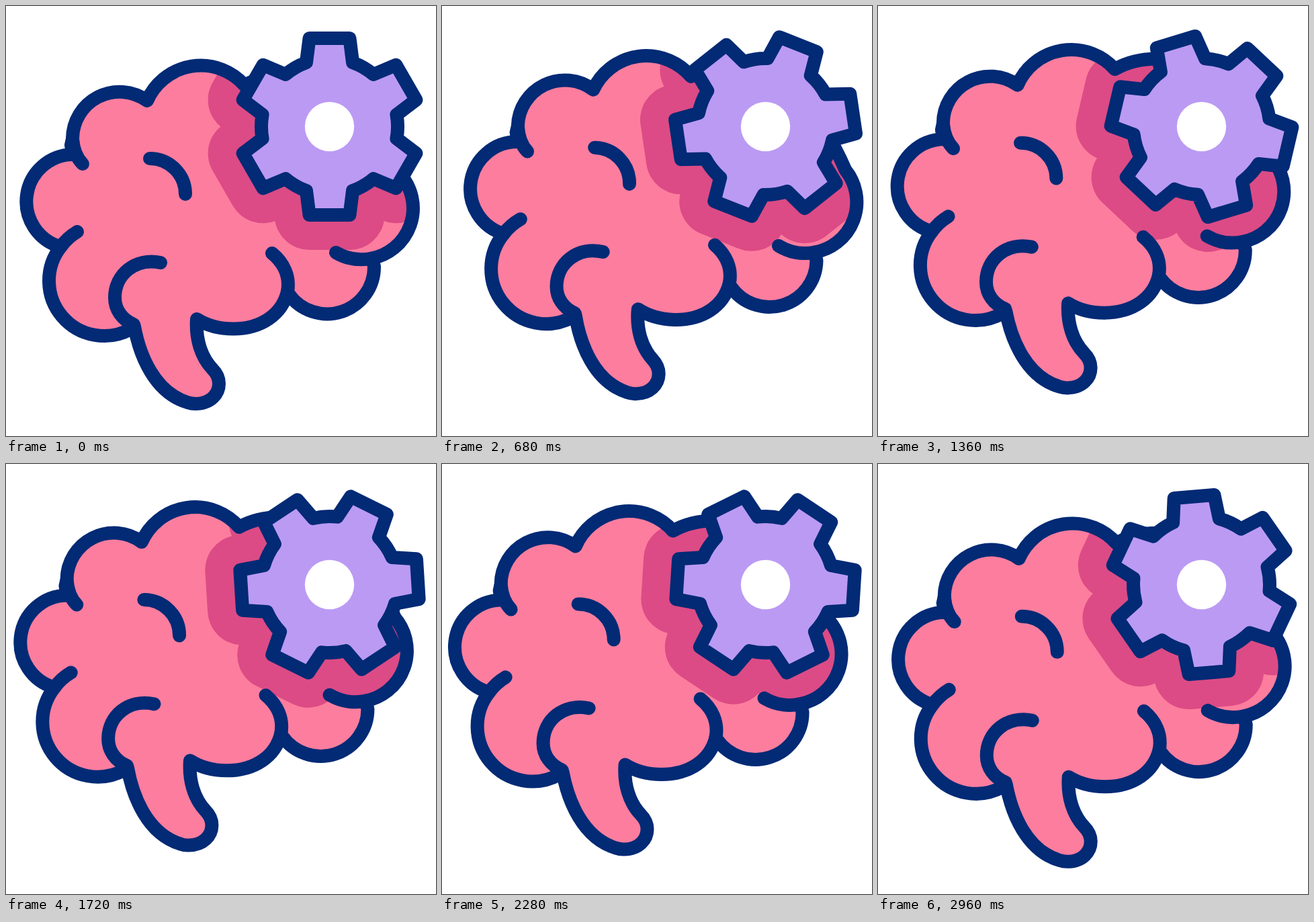
An HTML page that plays this animation: 640x640 px, repeating every 3000 ms.

```html
<!DOCTYPE html>
<html lang="en">
<head>
<meta charset="utf-8">
<title>Brain and gear</title>
<style>
  html, body { margin: 0; width: 100%; height: 100%; overflow: hidden; background: #fff; }
  svg { display: block; width: 100%; height: 100%; }
  .line { fill: none; stroke: #022a75; stroke-width: 20; stroke-linecap: round; stroke-linejoin: round; }
  .flesh { fill: #fd7d9e; }
  .shadow { fill: #dc4b85; stroke: #dc4b85; stroke-width: 104; stroke-linejoin: round; }
  .gear { fill: #bb9af3; stroke: #022a75; stroke-width: 20; stroke-linejoin: round; }
</style>
</head>
<body>
<svg viewBox="0 0 640 640">
  <defs>
    <path id="outline" d="M210 141A87 87 0 0 1 355 118Q382 103 415 103C490 103 548 165 588 252
      A76 76 0 0 1 545 375.5L548 388A70 70 0 0 1 421 429L419 425
      C411 459 380 480.5 338 480.5C318 480.5 300 476 284 466
      C282 495 290 522 307 540C312 545 317 552 317 562C317 577 305 592 282 592
      Q276 592 270 590C221 575 199 520 191 477L185.8 480.7
      A82 82 0 0 1 81.5 358.4A70 70 0 0 1 99 221L97 207L99 198A70 70 0 0 1 210 141Z"/>
    <path id="folds" d="M99 198Q101 222 114 235M214 227A53 53 0 0 1 267 280
      M106 336A82 82 0 0 0 81.5 358.4M230 382C192 374 162 400 162 434C162 452 173 467 190 474
      M419 425C423 402 413 382 396 368M491 367A76 76 0 0 0 545 375.5"/>
    <path id="cog"/>
    <clipPath id="inside"><use href="#outline" class="sway"/></clipPath>
  </defs>

  <use href="#outline" class="flesh sway"/>
  <g clip-path="url(#inside)"><use href="#cog" class="shadow spin"/></g>
  <g class="line sway"><use href="#outline"/><use href="#folds"/></g>
  <use href="#cog" class="gear spin"/>
  <circle cx="481.5" cy="179.5" r="36.7" fill="#fff"/>
</svg>
<script>
const { PI, sin, cos, max, floor } = Math;
const LOOP = 3000, STEP = 40;
const HUB = [481.5, 179.5], STEM = [283, 592];
const TEETH = 6, ROOT = 101.5, TIP = 134.9;

function cogPath() {
  const point = (r, a) => `${HUB[0] + r * sin(a)} ${HUB[1] - r * cos(a)}`;
  let d = "M" + point(ROOT, -0.347);
  for (let i = 0; i < TEETH; i++) {
    const a = i * 2 * PI / TEETH, next = a + 2 * PI / TEETH;
    d += `L${point(TIP, a - 0.224)}L${point(TIP, a + 0.224)}L${point(ROOT, a + 0.347)}`
      + `A${ROOT} ${ROOT} 0 0 1 ${point(ROOT, next - 0.347)}`;
  }
  return d + "Z";
}

// eases into the first tilt, then swings to and fro and dies away
function tilt(t) {
  const first = 420, half = 385, fade = 2300;
  const wave = t < first ? (1 - cos(PI * t / first)) / 2 : cos(PI * (t - first) / half);
  return -3.5 * max(0, 1 - t / fade) * wave;
}

// one slow lap around a closed curve
function drift(t) {
  const w = 2 * PI * t / LOOP, rise = (1 - cos(w)) / 2, side = sin(w) ** 2;
  return [
    8.8 * sin(w) - 3 * sin(2 * w) - 4.5 * rise - side,
    1.3 * sin(w) - 24 * rise - 6 * side
  ];
}

document.getElementById("cog").setAttribute("d", cogPath());
const spinning = document.querySelectorAll(".spin");
const swaying = document.querySelectorAll(".sway");
const place = (nodes, value) => nodes.forEach(n => n.setAttribute("transform", value));

function draw(ms) {
  const t = floor((ms % LOOP) / STEP + 0.001) * STEP % LOOP;
  place(spinning, `rotate(${360 * t / LOOP} ${HUB})`);
  place(swaying, `translate(${drift(t)}) rotate(${tilt(t)} ${STEM})`);
}

const start = performance.now();
function tick() {
  draw(performance.now() - start);
  requestAnimationFrame(tick);
}
tick();
</script>
</body>
</html>
```
